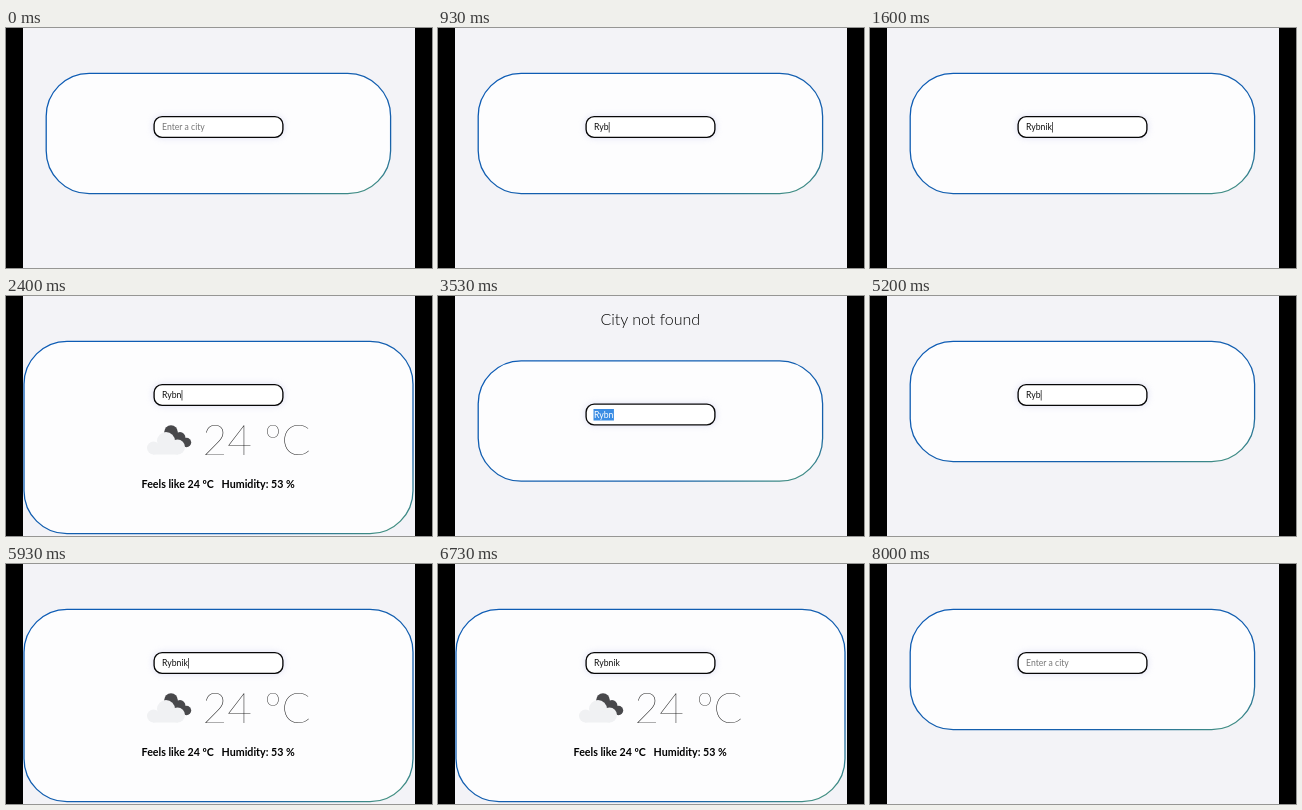
Animation of 426 by 240 pixels, one loop 8070 ms. Source, as an HTML page:

```html
<!DOCTYPE html>
<html lang="en">
<head>
<meta charset="utf-8">
<title>Weather search</title>
<style>
  html, body { margin: 0; height: 100%; overflow: hidden; background: #000; }
  svg { display: block; width: 426px; height: 240px; font-family: Lato, sans-serif; }
  .input { font-size: 8.67px; }
  .light { font-weight: 300; }
  .bold { font-size: 10.67px; font-weight: 700; }
</style>
</head>
<body>
<svg viewBox="0 0 426 240">
  <defs>
    <linearGradient id="edge" x1="0" y1="0" x2="1" y2="1">
      <stop offset="0" stop-color="#0c5bb5"/>
      <stop offset=".78" stop-color="#1660ac"/>
      <stop offset="1" stop-color="#4c9a78"/>
    </linearGradient>
    <filter id="glow" x="-20%" y="-80%" width="140%" height="260%">
      <feGaussianBlur stdDeviation="3.2"/>
    </filter>
  </defs>
  <rect x="17" width="392" height="240" fill="#f3f3f7"/>
  <text id="error" class="light" x="212.3" y="29" font-size="16" text-anchor="middle">City not found</text>
  <g id="page">
    <rect id="card" y="45.3" rx="43" fill="#fdfdfe" stroke="url(#edge)" stroke-width="1.3"/>
    <rect x="147" y="88" width="131" height="22" rx="9" fill="#c9cbed" opacity=".6" filter="url(#glow)"/>
    <rect x="148.1" y="88.6" width="128.8" height="20.8" rx="8" fill="#fff" stroke="#080808" stroke-width="1.35"/>
    <rect id="selection" x="155.5" y="93.5" height="11.5" fill="#3b8de4"/>
    <text id="value" class="input" x="156" y="102.4"></text>
    <rect id="caret" y="94" width=".7" height="10.5" fill="#111"/>
    <g id="result">
      <g fill="#48484b">
        <circle cx="165" cy="136" r="6.8"/>
        <circle cx="174" cy="141.5" r="5.4"/>
        <circle cx="180.5" cy="146.5" r="4.7"/>
        <path d="M160 138L170 133L178 151.2H168Z"/>
      </g>
      <g fill="#f0f1f3">
        <circle cx="160" cy="145" r="9"/>
        <circle cx="147.5" cy="152" r="6.5"/>
        <circle cx="171.5" cy="151" r="7.5"/>
        <rect x="147" y="148" width="25" height="10.5"/>
      </g>
      <text class="light" x="196.5" y="159" font-size="42.67" style="font-weight:200">24 ºC</text>
      <text class="bold" x="135.6" y="191.5">Feels like 24 ºC</text>
      <text class="bold" x="215.6" y="191.5">Humidity: 53 %</text>
    </g>
  </g>
</svg>
<script>
const LOOP = 8070;
const $ = id => document.getElementById(id);
const [error, page, card, selection, value, caret, result] =
  ["error", "page", "card", "selection", "value", "caret", "result"].map($);

// [time, typed text, view, selected]
const steps = [
  [0, "", "empty"],
  [530, "R", "empty"], [730, "Ry", "empty"], [870, "Ryb", "empty"],
  [1070, "Rybn", "empty"], [1200, "Rybni", "empty"], [1330, "Rybnik", "empty"],
  [1670, "Rybnik", "weather"],
  [2200, "Rybni", "weather"], [2330, "Rybn", "weather"],
  [2870, "Rybn", "error"], [3470, "Rybn", "error", true],
  [4130, "", "empty"],
  [4730, "R", "empty"], [4930, "Ry", "empty"], [5130, "Ryb", "empty"],
  [5330, "Rybn", "empty"], [5470, "Rybni", "empty"], [5600, "Rybnik", "empty"],
  [5930, "Rybnik", "weather"],
  [7670, "", "empty"]
];

const show = (el, on) => el.setAttribute("visibility", on ? "visible" : "hidden");
const set = (el, attrs) => Object.entries(attrs).forEach(([k, v]) => el.setAttribute(k, v));

function draw(t) {
  const [start, text, view, selected] = steps.findLast(s => s[0] <= t);
  const weather = view === "weather";
  set(card, weather
    ? { x: 18, width: 389, height: 192.4 }
    : { x: 40.2, width: 344.4, height: 120.4 });
  page.setAttribute("transform", `translate(0 ${view === "error" ? 19.5 : 0})`);
  show(error, view === "error");
  show(result, weather);

  value.textContent = text || "Enter a city";
  value.setAttribute("fill", selected ? "#fff" : text ? "#111" : "#777");
  const width = text ? value.getComputedTextLength() : 0;
  selection.setAttribute("width", width + 1);
  show(selection, selected);
  caret.setAttribute("x", 156.2 + width);
  show(caret, text && !selected && (t - start) % 1060 < 530);
}

function tick() {
  draw(performance.now() % LOOP);
  requestAnimationFrame(tick);
}
tick();
</script>
</body>
</html>
```
